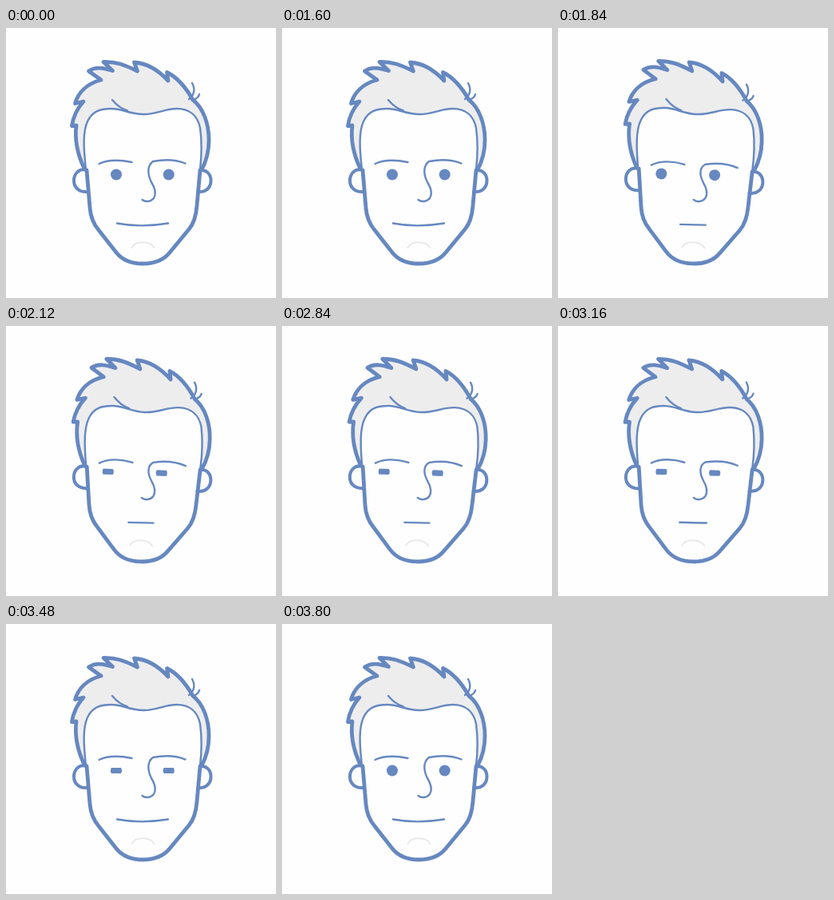
Animation, 338 px wide and 338 px high, one loop 5.32 s. Source, as an HTML page:

```html
<!DOCTYPE html>
<html lang="en">
<head>
<meta charset="utf-8">
<title>Glancing face</title>
<style>
  html, body { margin: 0; width: 100%; height: 100%; overflow: hidden; background: #fefefe; }
  svg { display: block; width: 100vw; height: 100vh; }
  .line { fill: none; stroke: #6688c0; stroke-width: 2.4; stroke-linecap: round; stroke-linejoin: round; }
  .bold { stroke-width: 4.8; }
  .ear { stroke-width: 4; fill: #fefefe; }
</style>
</head>
<body>
<svg viewBox="0 0 338 338">
  <g id="head">
    <path class="line ear" d="M101 178C91 175 85 183 85 191C85 200 92 206 102 205"/>
    <path class="line ear" d="M243 178C252 177 256.500 184 256.500 191C256.500 200 250 206 240 205"/>
    <path id="hairFill" fill="#ededee"/>
    <path class="line bold" fill="none" d="M101 178L105 225C106 238 110 246 116 253L138 281C146 291 158 295 171 295C184 295 197 291 205 281L229 252C235 245 238 235 239 222L243 178"/>
    <path id="hairEdge" class="line bold"/>
    <path id="hairline" class="line"/>
    <path class="line" d="M133 90C138 96 144 101 152 103.500"/>
    <path class="line" d="M233 69C237 76 236 84 229 89M242 83C241 87 238 89 233 90.500"/>
    <path id="brow" class="line"/>
    <path id="nose" class="line"/>
    <path id="mouth" class="line"/>
    <path d="M157.500 275C162 266 180 266 185.500 275" fill="none" stroke="#e9e9ea" stroke-width="2" stroke-linecap="round"/>
    <path id="eyeL" fill="#6688c0"/>
    <path id="eyeR" fill="#6688c0"/>
  </g>
</svg>
<script>
const LOOP = 5320, STEP = 40, EYE = 7;
const el = id => document.getElementById(id);
const draw = (id, d) => el(id).setAttribute('d', d);
const mix = (a, b, k) => a + (b - a) * k;

const edge = '98 176C88 155 86 138 88 122L82.500 122.500C84 112 88 102 97 92L86.500 94.500' +
  'C90 82 100 70 119 65L103.500 54C112 48 122 50 133.500 53.500L122 42.500C138 42 148 46 164.500 54' +
  'L160.500 43C176 44 190 52 203 66L201.500 55.500C215 62 226 76 234 90C247 100 254 120 254 140C254 155 250 168 245 177';
const line = 'C245 160 245 140 243 125C240 110 230 101 214 101C198 101 190 108 172 108' +
  'C155 108 146 101 132 101C118 101 108 104 102 117C96 130 97 150 100 177';
draw('hairEdge', 'M' + edge);
draw('hairline', 'M243 177' + line);
draw('hairFill', 'M' + edge + 'L243 177' + line + 'Z');

// Each feature: facing forward, glancing aside
const brow = [[116.5, 170, 128, 164.5, 143, 165, 157.5, 168], [116.5, 173, 128, 167, 144, 167, 158, 171.3]];
const nose = [
  [224.5, 169.5, 212, 164.5, 197, 164.5, 184, 167, 176, 173, 177.5, 184, 182, 193],
  [224.5, 173.8, 212, 168.5, 197, 168.2, 184, 170.5, 176, 175, 177.5, 185, 182, 193]
];
const mouth = [[139, 244.5, 160, 248.5, 182, 248, 203, 244.5], [155, 246.3, 165, 246.3, 175, 246.3, 186, 246.3]];

// Start point followed by cubic segments
function curve([a, b], k) {
  const [x, y, ...rest] = a.map((v, i) => mix(v, b[i], k));
  return `M${x} ${y}C${rest.join(' ')}`;
}

// Eased progress between two times: cubic-bezier(.8, 0, .3, 1)
function ease(t, from, to) {
  const x = Math.min(1, Math.max(0, (t - from) / (to - from)));
  let lo = 0, hi = 1;
  for (let i = 0; i < 24; i++) {
    const s = (lo + hi) / 2, r = 1 - s;
    if (2.4 * r * r * s + 0.9 * r * s * s + s * s * s < x) lo = s; else hi = s;
  }
  const s = (lo + hi) / 2;
  return s * s * (3 - 2 * s);
}

// A disc cut flat above and below
function eye(id, x, y, h) {
  const c = Math.sqrt(Math.max(0, EYE * EYE - h * h));
  const arc = `A${EYE} ${EYE} 0 0 0 `;
  draw(id, `M${x - c} ${y - h}${arc}${x - c} ${y + h}L${x + c} ${y + h}${arc}${x + c} ${y - h}Z`);
}

function render(time) {
  const t = Math.floor((time % LOOP) / STEP) * STEP;
  const turn = ease(t, 1600, 1880) - ease(t, 3000, 3520);
  const look = ease(t, 1600, 1960) - ease(t, 2920, 3520);
  const squint = ease(t, 1880, 2120) - ease(t, 3520, 3800);

  el('head').setAttribute('transform', `rotate(${1.5 * turn} 171 185)`);
  draw('brow', curve(brow, turn));
  draw('nose', curve(nose, turn) + 'C187 201 188 208 185 213C181 218 174 218 170.500 215');
  draw('mouth', curve(mouth, turn));
  const h = mix(EYE, 3.6, squint);
  eye('eyeL', 138 - 10.3 * look, 183.5, h);
  eye('eyeR', 203.7 - 9 * look, 183.5, h);
}

const start = performance.now();
function tick() {
  render(performance.now() - start);
  requestAnimationFrame(tick);
}
tick();
</script>
</body>
</html>
```
